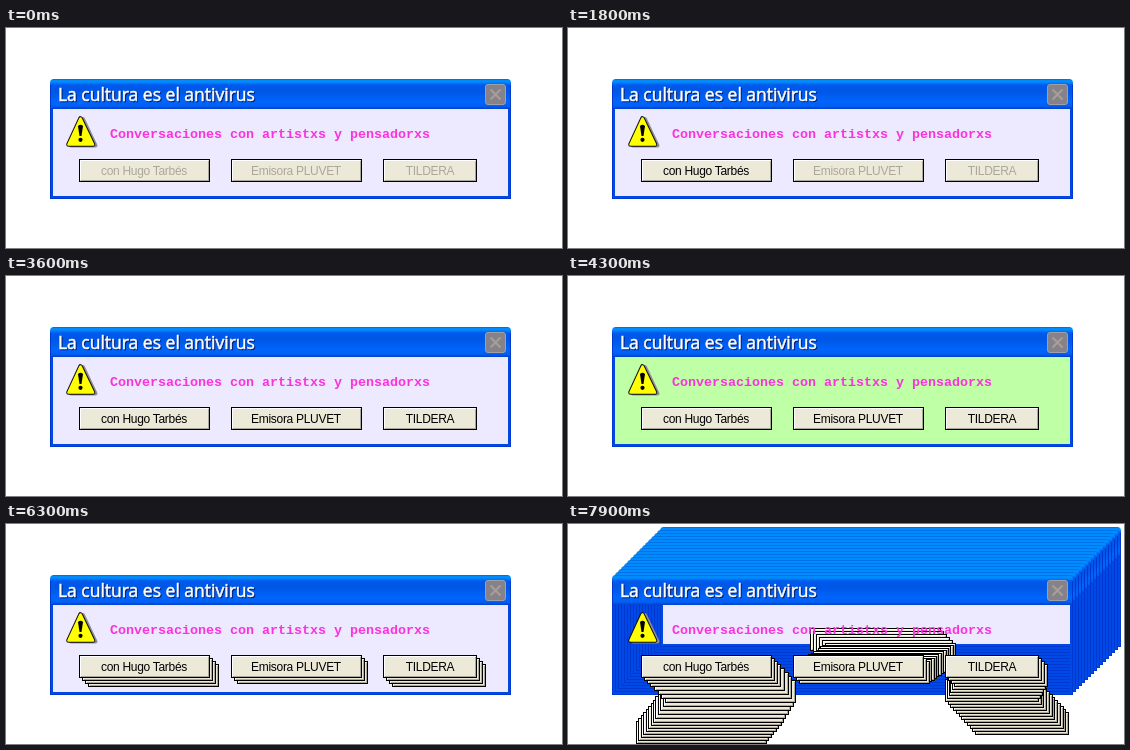
An HTML page for the animation above (8 s loop, 556 by 220 pixels).

```html
<!DOCTYPE html>
<html lang="es">
<head>
<meta charset="utf-8">
<title>La cultura es el antivirus</title>
<style>
  html, body { margin: 0; width: 100%; height: 100%; overflow: hidden; background: #fff; }
  svg { display: block; width: 556px; height: 220px; }
  .back { fill: #ede9fe; }
  .green .back { fill: #bfffa5; }
  .title { font: 17.5px "Open Sans", "Noto Sans", sans-serif; fill: #fff; stroke: #fff; stroke-width: .5px; }
  .title.shade { fill: #0a1f6c; stroke: #0a1f6c; }
  .lead { font: bold 13.33px "Liberation Mono", monospace; fill: #fb32dc; }
  .label { font: 12px "Liberation Sans", sans-serif; letter-spacing: -.3px; text-anchor: middle; fill: #000; }
  .off { fill: #aca899; }
  .box { fill: #ece9d8; stroke: #000; shape-rendering: crispEdges; }
  .light, .dark { fill: none; stroke: #fff; shape-rendering: crispEdges; }
  .dark { stroke: #aca899; }
</style>
</head>
<body>
<svg id="stage" viewBox="0 0 556 220">
  <defs>
    <linearGradient id="bar" x1="0" y1="0" x2="0" y2="1">
      <stop offset="0" stop-color="#0062e4"/>
      <stop offset=".06" stop-color="#0094ff"/>
      <stop offset=".12" stop-color="#0080fa"/>
      <stop offset=".2" stop-color="#005aee"/>
      <stop offset=".4" stop-color="#0056e5"/>
      <stop offset=".75" stop-color="#0065fc"/>
      <stop offset=".9" stop-color="#0060f4"/>
      <stop offset="1" stop-color="#0040cc"/>
    </linearGradient>
    <g id="frame">
      <path fill="#0049e6" d="M44 75h3v93h455V75h3v96H44z" shape-rendering="crispEdges"/>
      <path fill="url(#bar)" d="M44 81V55q0-4 4-4h453q4 0 4 4v26z"/>
      <path fill="none" stroke="#0038d0" d="M44.500 57V170.500H504.500V57" shape-rendering="crispEdges"/>
    </g>
  </defs>

  <rect class="back" x="47" y="81" width="455" height="87"/>
  <g id="frames"></g>
  <use href="#frame"/>
  <text class="title shade" x="53" y="74">La cultura es el antivirus</text>
  <text class="title" x="52" y="73">La cultura es el antivirus</text>
  <g fill="none">
    <rect x="479.5" y="56.5" width="20" height="20" rx="2.5" fill="#85828a" stroke="#a19fac"/>
    <path d="M484.500 61.500l10 10m0-10l-10 10" stroke="#a79d99" stroke-width="2.200"/>
  </g>

  <g id="trails"></g>

  <g stroke-linejoin="round">
    <path d="M77 91l12.500 26.500H65z" fill="#8d8d98" stroke="#8d8d98" stroke-width="4"/>
    <path d="M74.500 90.500L87 116.500H62.500z" fill="#111" stroke="#111" stroke-width="4.600"/>
    <path d="M74.500 90.500L87 116.500H62.500z" fill="#ff0" stroke="#ff0" stroke-width="2.600"/>
    <path d="M72 98q2.500-2.500 5 0l-1.500 10h-2z"/>
    <circle cx="74.500" cy="111.800" r="2.100"/>
  </g>
  <text class="lead" x="104" y="110">Conversaciones con artistxs y pensadorxs</text>
  <g id="buttons"></g>
</svg>

<script>
const LOOP = 8000;
const LAST_STEP = 48, FRAME_START = 32;

// on: step that enables the label; from: step before the first copy
// path: [copy, dx, dy] turning points of the trail
const buttons = [
  { text: 'con Hugo Tarbés', x: 73, w: 131, mid: 138, on: 4, from: 29,
    path: [[0, 0, 0], [3, 9, 9], [7, 24, 25], [12, 12, 45], [19, -5, 66]] },
  { text: 'Emisora PLUVET', x: 225, w: 131, mid: 290, on: 8, from: 30,
    path: [[0, 0, 0], [2, 6, 6], [13, 32, -12], [18, 17, -27]] },
  { text: 'TILDERA', x: 377, w: 94, mid: 424, on: 12, from: 29,
    path: [[0, 0, 0], [3, 9, 9], [8, 0, 24], [19, 30, 57]] }
];

const stage = document.getElementById('stage');
const copies = [];

function add(parent, tag, attrs) {
  const el = document.createElementNS('http://www.w3.org/2000/svg', tag);
  for (const key in attrs) el.setAttribute(key, attrs[key]);
  parent.appendChild(el);
  return el;
}

function along(path, n) {
  const i = path.findIndex(p => p[0] >= n);
  const [a, b] = [path[i - 1], path[i]];
  const k = (n - a[0]) / (b[0] - a[0]);
  return [1, 2].map(j => Math.round(a[j] + (b[j] - a[j]) * k));
}

function drawBox(parent, { x, w }, [dx, dy] = [0, 0]) {
  const g = add(parent, 'g', { transform: `translate(${x + dx} ${131 + dy})` });
  add(g, 'rect', { class: 'box', x: .5, y: .5, width: w - 1, height: 22 });
  add(g, 'path', { class: 'light', d: `M1.5 21V1.5H${w - 2}` });
  add(g, 'path', { class: 'dark', d: `M2 21.5H${w - 1.5}V2` });
  return g;
}

// Later copies lie behind earlier ones.
const frames = document.getElementById('frames');
for (let n = LAST_STEP - FRAME_START; n > 0; n--) {
  const el = add(frames, 'use', { href: '#frame', x: 3 * n, y: -3 * n });
  copies.push({ el, from: FRAME_START + n });
}

const trails = document.getElementById('trails');
const front = document.getElementById('buttons');
for (const b of buttons) {
  for (let n = LAST_STEP - b.from; n > 0; n--) {
    copies.push({ el: drawBox(trails, b, along(b.path, n)), from: b.from + n });
  }
  drawBox(front, b);
  b.label = add(front, 'text', { class: 'label', x: b.mid, y: 147 });
  b.label.textContent = b.text;
}

// The beat quickens from 300 ms to 200 ms to 100 ms.
function stepAt(t) {
  if (t < 3900) return Math.floor(t / 300);
  if (t < 4900) return 13 + Math.floor((t - 3900) / 200);
  return 18 + Math.floor((t - 4900) / 100);
}

let shown = -1;
function show(step) {
  if (step === shown) return;
  shown = step;
  stage.classList.toggle('green', step % 2 === 1);
  for (const b of buttons) b.label.classList.toggle('off', step < b.on);
  for (const c of copies) c.el.style.display = step < c.from ? 'none' : '';
}

const start = performance.now();
function tick() {
  show(stepAt((performance.now() - start) % LOOP));
  requestAnimationFrame(tick);
}
tick();
</script>
</body>
</html>
```
